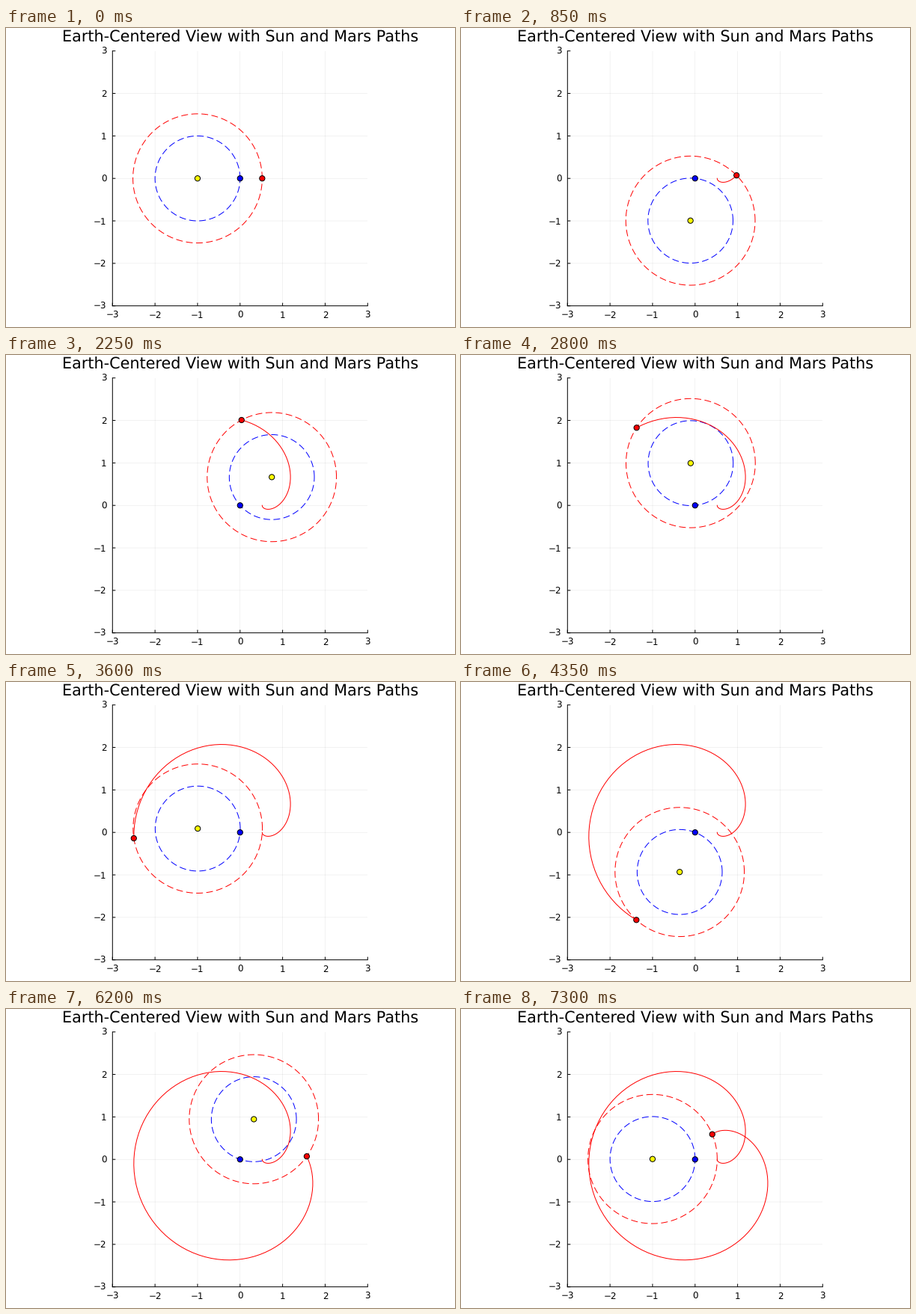
Write a matplotlib script that moves like this. It is 600 px wide and 400 px high and loops after 7350 ms.

```python
import numpy as np
import matplotlib.pyplot as plt
from matplotlib.animation import FuncAnimation

W, H, DPI = 600, 400, 100
PX = 72 / DPI                          # one pixel in points
LEFT, TOP, SIDE = 142.3, 30.7, 341     # plot square, in pixels
UNIT = 6 / SIDE                        # one pixel in data units

STEP_DAYS, LAST_DAY = 5, 730
EARTH_R, EARTH_YEAR = 1.0, 365.25
MARS_R, MARS_YEAR = 1.52, 687.0

plt.rcParams.update({
    "font.family": "DejaVu Sans",
    "text.hinting": "none",
})


def orbit(radius, angle):
    return np.array([radius * np.cos(angle), radius * np.sin(angle)])


days = np.arange(0, LAST_DAY + 1, STEP_DAYS)
sun = -orbit(EARTH_R, 2 * np.pi * days / EARTH_YEAR)
mars = sun + orbit(MARS_R, 2 * np.pi * days / MARS_YEAR)
ring = np.linspace(0, 2 * np.pi, 241)
ticks = np.arange(-3, 4)

fig = plt.figure(figsize=(W / DPI, H / DPI), dpi=DPI, facecolor="white")
ax = fig.add_axes([LEFT / W, 1 - (TOP + SIDE) / H, SIDE / W, SIDE / H])
ax.set(xlim=(-3, 3), ylim=(-3, 3), xticks=ticks, yticks=ticks)
ax.set_axisbelow(True)
ax.grid(color="black", alpha=0.1, linewidth=0.5 * PX, snap=False)
ax.tick_params(length=0, labelsize=11.85 * PX)
ax.tick_params(axis="x", pad=7 * PX)
ax.tick_params(axis="y", pad=8 * PX)
for side in ("top", "right"):
    ax.spines[side].set_visible(False)
for side in ("left", "bottom"):
    ax.spines[side].set(linewidth=PX, snap=False)

# Inward ticks
tick_style = dict(color="black", linewidth=PX, snap=False, clip_on=False)
ax.vlines(ticks, -3, -3 + 4 * UNIT, **tick_style)
ax.hlines(ticks, -3, -3 + 4 * UNIT, **tick_style)

fig.text((LEFT + SIDE / 2) / W, 1 - 19 / H,
         "Earth-Centered View with Sun and Mars Paths",
         ha="center", va="baseline", fontsize=20.75 * PX)


def line(color, style="-"):
    return ax.plot([], [], color=color, linestyle=style,
                   linewidth=PX, zorder=3)[0]


def dot(color):
    return ax.add_patch(plt.Circle((0, 0), 3.6 * UNIT, facecolor=color,
                                   edgecolor="black", linewidth=PX, zorder=4))


DASH = (0, (9, 4.5))
earth_ring = line("blue", DASH)
mars_ring = line("red", DASH)
trail = line("red")
earth_dot, sun_dot, mars_dot = dot("blue"), dot("yellow"), dot("red")


def update(i):
    center = sun[:, i:i + 1]
    earth_ring.set_data(*(center + orbit(EARTH_R, ring)))
    mars_ring.set_data(*(center + orbit(MARS_R, ring)))
    trail.set_data(*mars[:, :i + 1])
    sun_dot.center = sun[:, i]
    mars_dot.center = mars[:, i]
    return earth_ring, mars_ring, trail, sun_dot, mars_dot


anim = FuncAnimation(fig, update, frames=len(days), interval=50,
                     repeat=True, repeat_delay=0)
plt.show()
```
